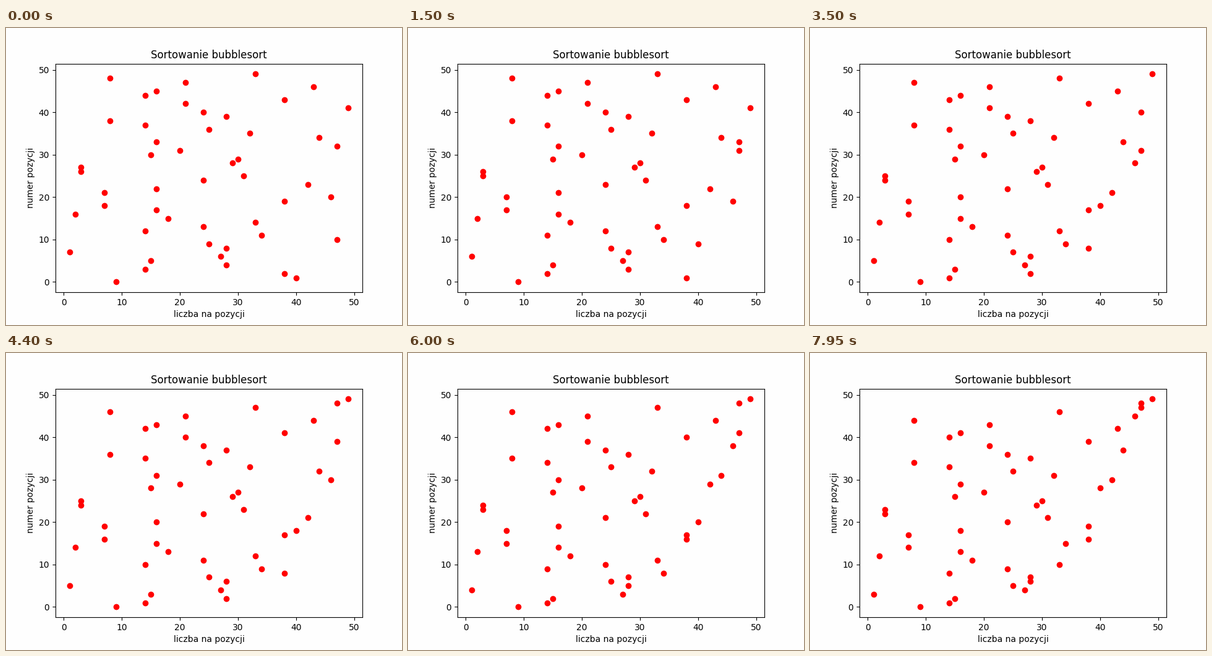
A matplotlib script that plays this animation: 640 px wide and 480 px high, repeating every 8000 ms.

```python
from itertools import islice

import matplotlib.pyplot as plt
from matplotlib.animation import FuncAnimation

FRAMES = 160
INTERVAL = 50
PAPER = "#fefefe"

# The unsorted input; every later state follows from the sort itself.
NUMBERS = [9, 40, 38, 14, 28, 15, 27, 1, 28, 25,
           47, 34, 14, 24, 33, 18, 2, 16, 7, 38,
           46, 7, 16, 42, 24, 31, 3, 3, 29, 30,
           15, 20, 47, 16, 44, 32, 25, 14, 8, 28,
           24, 49, 21, 38, 14, 16, 43, 21, 8, 33]


def bubble_sort(values):
    """Yield the list at the start and after every swap."""
    a = list(values)
    yield a[:]
    for end in range(len(a) - 1, 0, -1):
        for j in range(end):
            if a[j] > a[j + 1]:
                a[j], a[j + 1] = a[j + 1], a[j]
                yield a[:]


states = list(islice(bubble_sort(NUMBERS), FRAMES))

fig, ax = plt.subplots(figsize=(6.4, 4.8), dpi=100, facecolor=PAPER)
ax.set_facecolor(PAPER)
dots, = ax.plot(NUMBERS, range(len(NUMBERS)), "ro")
ax.set_title("Sortowanie bubblesort")
ax.set_xlabel("liczba na pozycji")
ax.set_ylabel("numer pozycji")


def update(i):
    dots.set_xdata(states[i])
    return dots,


anim = FuncAnimation(fig, update, frames=FRAMES, interval=INTERVAL,
                     repeat=True, repeat_delay=0)
plt.show()
```
